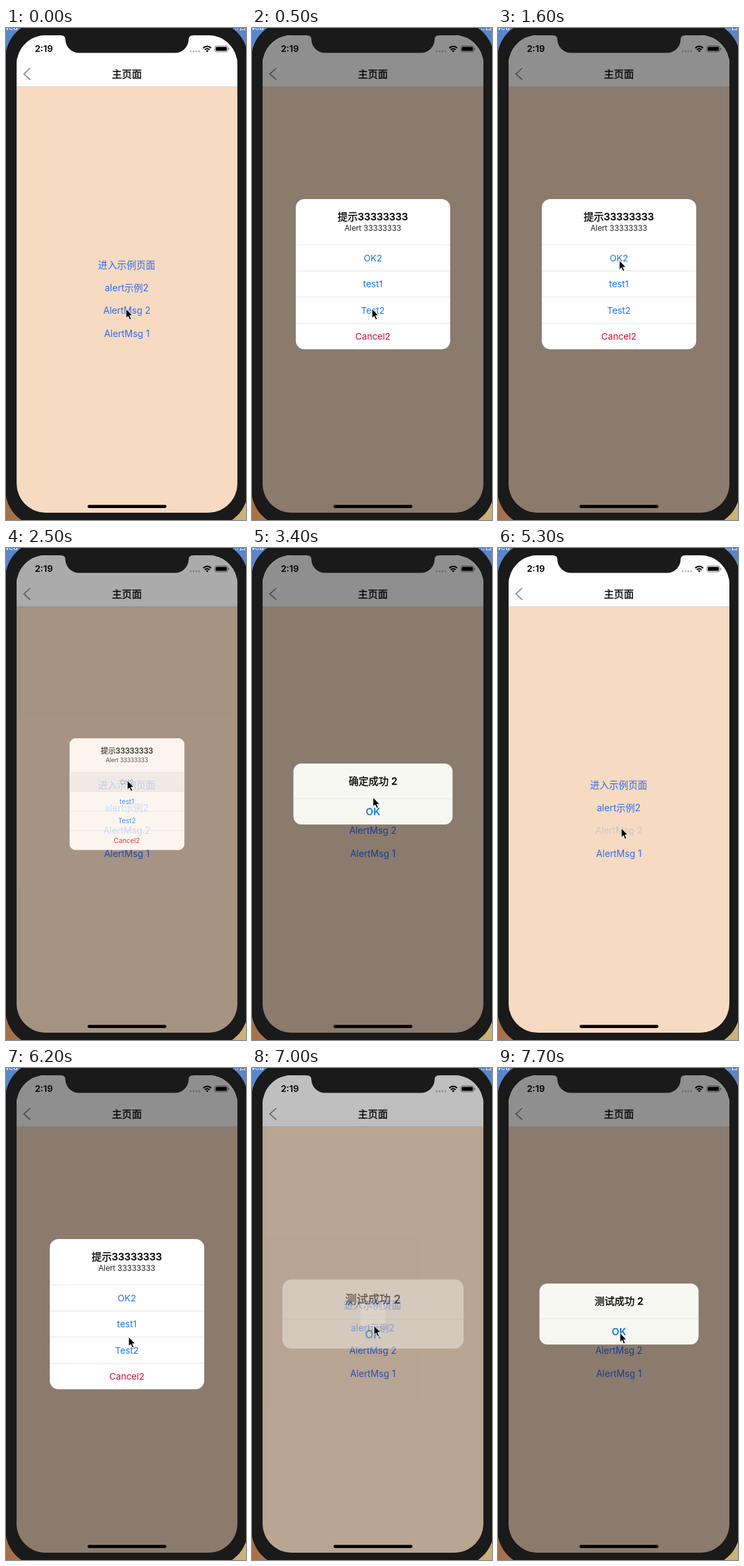
Recreate the animation shown at these times as an HTML page. Size 362 by 742 pixels, loop 8000 ms.

```html
<!DOCTYPE html>
<html lang="zh-CN">
<head>
<meta charset="utf-8">
<title>Alert demo</title>
<style>
  html, body { margin: 0; width: 100%; height: 100%; overflow: hidden; background: #1a1a1a; }
  svg { display: block; width: 100%; height: 100%; }
  text { font-family: Inter, "Noto Sans CJK SC", "Noto Sans CJK", sans-serif; text-anchor: middle; }
  .bold { font-weight: 600; }
  .title { font-weight: 500; font-size: 15.1px; stroke: #000; stroke-width: .3; }
  .link { fill: #2f6bf2; font-size: 13.8px; }
  .link.pressed { fill: #cec3c4; }
  .action { fill: #1679e6; font-size: 13.6px; }
  .action.cancel { fill: #d9062b; }
  .row { fill: #f0f0f0; visibility: hidden; }
  .pressed .row { visibility: visible; }
  .pressed .action { opacity: .6; }
  .rule { stroke: #e4e4e4; }
</style>
</head>
<body>
<svg viewBox="0 0 362 742">
  <defs>
    <linearGradient id="sand"><stop stop-color="#a5714a"/><stop offset="1" stop-color="#cdb27a"/></linearGradient>
    <clipPath id="screen"><rect x="16" y="11" width="333" height="720" rx="44"/></clipPath>
    <clipPath id="card"><rect x="66" y="258" width="233" height="226.5" rx="13"/></clipPath>
  </defs>

  <rect width="362" height="371" fill="#5a86c8"/>
  <rect y="371" width="362" height="371" fill="url(#sand)"/>
  <g fill="#fff" font-size="11">
    <text x="6" y="3">Wed</text>
    <text x="352" y="3">...台</text>
  </g>
  <rect x="-1" y="-10" width="366" height="762" rx="56" fill="#1a1a1a"/>

  <g clip-path="url(#screen)">
    <rect width="362" height="742" fill="#f6dbc2"/>
    <rect width="362" height="88" fill="#fefefe"/>
    <path d="M16 88.500H349" stroke="#dfd5cd"/>
    <text class="bold" x="57" y="36" font-size="13.6">2:19</text>
    <path d="M278.500 35H292" stroke="#bdbdbd" stroke-width="3" stroke-linecap="round" stroke-dasharray="0 4.300"/>
    <path d="M297.500 30.300Q303.500 25 309.500 30.300M299.800 32.800Q303.500 29.600 307.200 32.800"
      fill="none" stroke="#000" stroke-width="2"/>
    <path d="M301.300 34.200Q303.500 32.600 305.700 34.200L303.500 36.600z"/>
    <rect x="315" y="27" width="19.5" height="9" rx="2.6" fill="none" stroke="#777" stroke-width=".9"/>
    <rect x="316.4" y="28.4" width="16.7" height="6.2" rx="1.4"/>
    <path d="M335.600 30v3q1.400-.4 1.400-1.500t-1.400-1.500" fill="#777"/>
    <path d="M36.500 60.500L27 69.300 36.500 78" fill="none" stroke="#8b8b8b" stroke-width="1.7"/>
    <text class="title" x="182.3" y="74.5">主页面</text>

    <text class="link" x="182" y="363" style="font-size:14.4px">进入示例页面</text>
    <text class="link" x="182" y="396.5" style="font-size:14px">alert示例2</text>
    <text class="link" id="opener" x="182.3" y="431.3">AlertMsg 2</text>
    <text class="link" x="182.3" y="466">AlertMsg 1</text>

    <g id="overlay">
      <rect width="362" height="742" fill-opacity=".44"/>
      <g id="dialog" clip-path="url(#card)">
        <rect x="66" y="258" width="233" height="227" fill="#fff"/>
        <text class="title" x="182.3" y="289.6">提示33333333</text>
        <text x="182.3" y="306.3" font-size="11.5" fill="#222">Alert 33333333</text>
        <g id="actions"></g>
      </g>
    </g>

    <rect id="dim" width="362" height="742" fill-opacity=".44"/>
    <g id="notice">
      <rect x="62.5" y="325" width="240" height="92" rx="12" fill="#f8f8f3"/>
      <path class="rule" d="M62.500 378H302.500"/>
      <text class="title" id="message" x="182.5" y="356.8"></text>
      <text class="bold" x="182.5" y="403.4" font-size="14.8" fill="#1677e8">OK</text>
    </g>
    <rect x="123" y="719.3" width="119" height="4.6" rx="2.3"/>
  </g>

  <path fill="#1a1a1a" d="M83 10V11.300Q89.500 11.300 89.500 17A20.500 20.500 0 0 0 110 37.500H255A20.500 20.500 0 0 0 275.500 17Q275.500 11.300 282 11.300V10z"/>
  <path id="cursor" d="M0-.5V13.600L3.200 10.700 5.500 15.900 7.900 14.900 5.600 9.800H10z" stroke="#fff" stroke-width=".9"/>
</svg>
<script>
const LOOP = 8000, FRAME = 100;
const $ = id => document.getElementById(id);

// A round: press the link, the dialog opens, a row is tapped, a notice confirms it.
const rounds = [
  { press: 100, open: 200, tap: 1800, close: 2400, dismiss: 3700, row: 0, message: '确定成功 2' },
  { press: 5200, open: 5400, tap: 6600, close: 6800, dismiss: LOOP, row: 1, message: '测试成功 2' }
];
// Cursor stops: when it sets off, and where to.
const stops = [
  { start: 0, x: 181, y: 424 }, { start: 800, x: 183, y: 351 }, { start: 3100, x: 182, y: 402 },
  { start: 4000, x: 186, y: 423 }, { start: 5900, x: 184, y: 389 }, { start: 7100, x: 184, y: 400 }
];

$('actions').innerHTML = ['OK2', 'test1', 'Test2', 'Cancel2'].map((label, i) => {
  const top = 327 + i * 39.4;
  return `<g><rect class="row" x="66" y="${top}" width="233" height="39.4"/>
    <path class="rule" d="M66 ${top}H299"/>
    <text class="action ${i === 3 ? 'cancel' : ''}" x="182.3" y="${top + 24.7}">${label}</text></g>`;
}).join('');

const progress = (t, start, length) => Math.min(1, Math.max(0, (t - start) / length));
const easeOut = p => 1 - (1 - p) ** 2;
const easeInOut = p => p < .5 ? 2 * p * p : 1 - 2 * (1 - p) ** 2;
const during = (t, start, end) => t >= start && t < end;
const press = (el, on) => el.classList.toggle('pressed', on);
const fade = (id, value) => $(id).setAttribute('opacity', value);
const scale = (id, s) =>
  $(id).setAttribute('transform', `translate(182.4 371.1) scale(${s}) translate(-182.4 -371.1)`);

function moveCursor(t) {
  const i = stops.findLastIndex(stop => t >= stop.start);
  const to = stops[i], from = stops[i - 1] || to;
  const p = easeInOut(progress(t, to.start, 600));
  const mix = axis => from[axis] + (to[axis] - from[axis]) * p;
  $('cursor').setAttribute('transform', `translate(${mix('x')} ${mix('y')})`);
}

function draw(now) {
  const t = Math.floor(now % LOOP / FRAME) * FRAME;
  const round = rounds.findLast(r => t >= r.press) || rounds[0];

  const dialog = easeInOut(progress(t, round.open, 200)) - easeInOut(progress(t, round.close, 280));
  fade('overlay', dialog);
  scale('dialog', dialog);

  const arrival = easeOut(progress(t, round.close + 100, 400));
  const notice = arrival - easeInOut(progress(t, round.dismiss, 380));
  fade('notice', notice);
  fade('dim', notice);
  scale('notice', 1 + .245 * (1 - arrival));
  $('message').textContent = round.message;

  press($('opener'), during(t, round.press, round.open + 100));
  [...$('actions').children].forEach((row, i) => press(row, i === round.row && t >= round.tap));
  moveCursor(t);
}

const start = performance.now();
function tick() {
  draw(performance.now() - start);
  requestAnimationFrame(tick);
}
tick();
</script>
</body>
</html>
```
